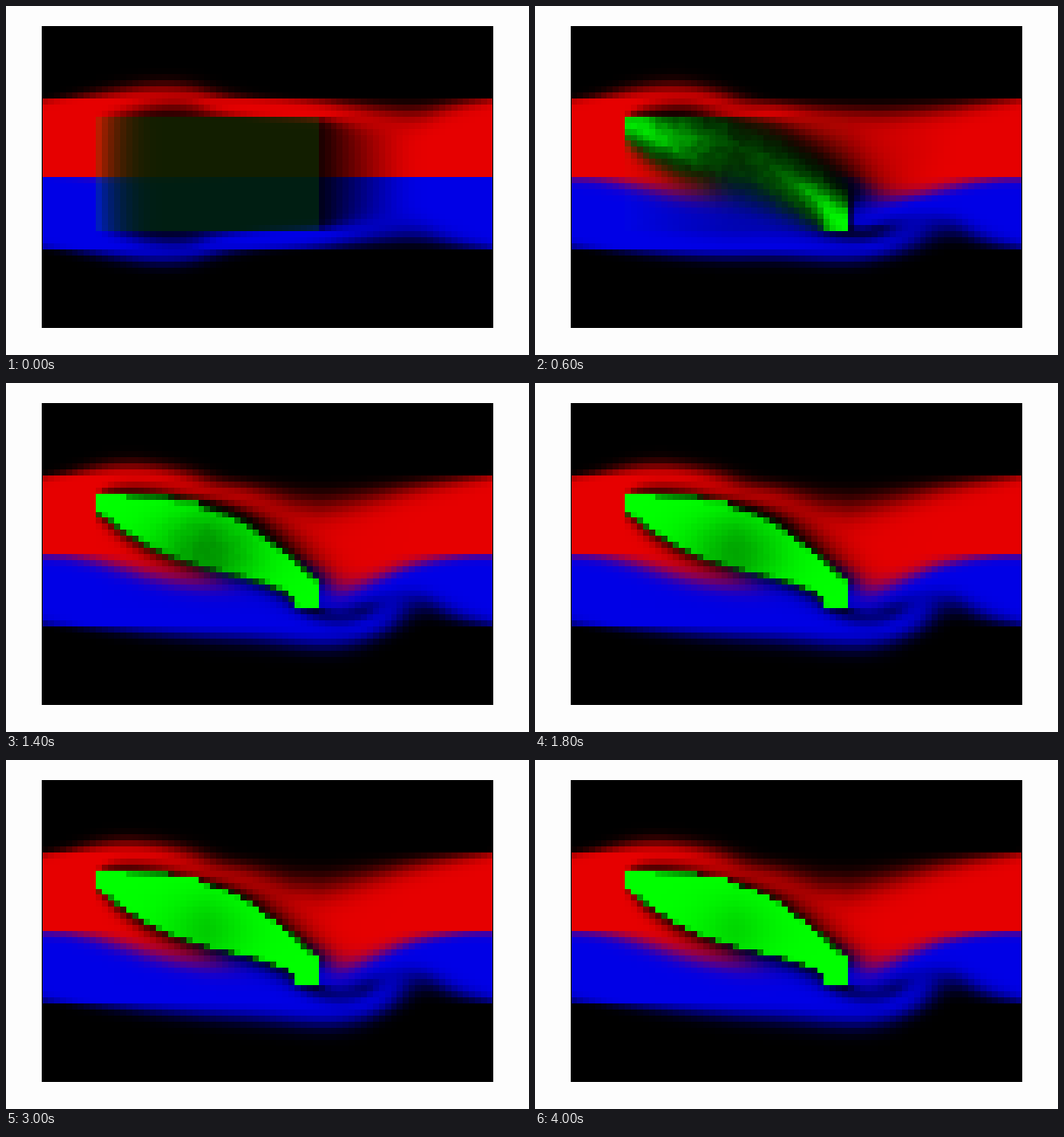
Recreate the animation shown at these times as an HTML page with a canvas. Size 600 by 400 pixels, loop 4.2 s.

```html
<!DOCTYPE html>
<html lang="en">
<head>
<meta charset="utf-8">
<title>Wing in a smoke tunnel</title>
<style>
  html, body { margin: 0; width: 100%; height: 100%; overflow: hidden; background: #fdfdfd; }
  canvas { display: block; }
</style>
</head>
<body>
<canvas id="stage" width="600" height="400"></canvas>
<script>
const COLS = 75, ROWS = 50, N = COLS * ROWS;
const STEP = 200, FRAMES = 21;
const FLOW_STEPS = 20, RELAX = 50;
const BOX = { x: 41, y: 23, w: 518, h: 346 };
const AREA = { left: 9, right: 46, top: 15, bottom: 34 };
const CELL = BOX.w / COLS;

// Wing outline in stage pixels
const UPPER = [[103, 121], [128, 124], [140, 130.5], [186, 130.5], [193, 133.5], [217, 134], [224, 140],
  [255, 150], [276, 161], [297, 177], [317, 191], [331, 203], [345, 218], [358, 228]];
const LOWER = [[103, 147], [117, 154], [131, 168], [165, 189], [193, 203], [235, 216],
  [262, 222], [297, 230], [324, 240], [338, 262], [358, 275]];

// Step of the optimisation, then solidity of core, rise to the tips, outside, edge width
const CORE = [[0, -1], [1, -.95], [2, -.85], [3, -.75], [5, -.1], [7, .15], [11, .45], [15, .7], [20, .85]];
const TIPS = [[0, 0], [1, .6], [2, 1.3], [3, 1.9], [5, 2.1], [7, 2.4], [11, 2.8], [20, 3.2]];
const OUTSIDE = [[0, -1], [1, -1.4], [3, -2.2], [5, -3], [7, -3.3], [11, -3.6], [20, -4]];
const EDGE = [[0, 4], [3, 4], [5, 2], [7, 1.1], [11, .7], [20, .5]];
const GRAIN = [[0, 0], [3, .1], [7, .04], [11, 0]];

const clamp = (v, lo, hi) => Math.max(lo, Math.min(hi, v));
const field = value => new Float64Array(N).fill(value);

function curve(points, x) {
  if (x <= points[0][0]) return points[0][1];
  for (let i = 1; i < points.length; i++) {
    const [x0, y0] = points[i - 1], [x1, y1] = points[i];
    if (x <= x1) return y0 + (y1 - y0) * (x - x0) / (x1 - x0);
  }
  return points[points.length - 1][1];
}

function grain(i) {
  const s = Math.sin(i * 12.9898) * 43758.5453;
  return (s - Math.floor(s)) * 2 - 1;
}

// Neighbours wrap around both axes
const L = new Int32Array(N), R = new Int32Array(N), U = new Int32Array(N), D = new Int32Array(N);
for (let i = 0; i < N; i++) {
  const c = i % COLS, r = (i - c) / COLS;
  L[i] = r * COLS + (c + COLS - 1) % COLS;
  R[i] = r * COLS + (c + 1) % COLS;
  U[i] = (r + ROWS - 1) % ROWS * COLS + c;
  D[i] = (r + 1) % ROWS * COLS + c;
}

function solidity(step) {
  const core = curve(CORE, step), tips = curve(TIPS, step), outside = curve(OUTSIDE, step);
  const edge = curve(EDGE, step), rough = curve(GRAIN, step);
  const solid = field(0);
  for (let r = AREA.top; r < AREA.bottom; r++) {
    for (let c = AREA.left; c < AREA.right; c++) {
      const i = r * COLS + c;
      const x = BOX.x + (c + .5) * CELL, y = BOX.y + (r + .5) * BOX.h / ROWS;
      const depth = Math.min(y - curve(UPPER, x), curve(LOWER, x) - y) / CELL;
      const inside = clamp(.6 + .5 * depth / edge, 0, 1);
      const along = Math.abs(x - 230) / 127, across = (y - 195) / 45;
      const tip = Math.min(1.3, along ** 1.6 + .25 * across * across);
      const level = outside + (core + tips * tip - outside) * inside + rough * grain(i);
      solid[i] = .5 * (Math.tanh(level) + 1);
    }
  }
  return solid;
}

function advect(f, vx, vy) {
  const out = field(0);
  for (let i = 0; i < N; i++) {
    const c = i % COLS, r = (i - c) / COLS;
    const x = c - vx[i], y = r - vy[i];
    const x0 = Math.floor(x), y0 = Math.floor(y), fx = x - x0, fy = y - y0;
    const col = ((x0 % COLS) + COLS) % COLS, row = ((y0 % ROWS) + ROWS) % ROWS;
    const a = row * COLS + col, b = D[a];
    out[i] = (1 - fy) * ((1 - fx) * f[a] + fx * f[R[a]]) + fy * ((1 - fx) * f[b] + fx * f[R[b]]);
  }
  return out;
}

// Smoke after a short run of an incompressible flow around the solid cells
function simulate(solid) {
  const open = solid.map(s => 1 - s);
  const weight = open.map((_, i) => 1 / (open[L[i]] + open[R[i]] + open[U[i]] + open[D[i]] + .001));

  const occlude = f => f.map((v, i) => v * open[i]);

  function fill(f, out) {
    for (let i = 0; i < N; i++) {
      const s = solid[i];
      if (s === 0) { out[i] = f[i]; continue; }
      const l = L[i], r = R[i], u = U[i], d = D[i];
      const near = f[l] * open[l] + f[r] * open[r] + f[u] * open[u] + f[d] * open[d];
      out[i] = f[i] * open[i] + s * near * weight[i];
    }
  }

  function project(vx, vy) {
    const raw = field(0), div = field(0), p = field(0);
    for (let i = 0; i < N; i++) raw[i] = -.5 * (vx[R[i]] - vx[L[i]] + vy[D[i]] - vy[U[i]]);
    fill(raw, div);
    for (let k = 0; k < RELAX; k++) {
      for (let i = 0; i < N; i++) raw[i] = (div[i] + p[L[i]] + p[R[i]] + p[U[i]] + p[D[i]]) / 4;
      fill(raw, p);
    }
    return [
      occlude(vx.map((v, i) => v - .5 * (p[R[i]] - p[L[i]]))),
      occlude(vy.map((v, i) => v - .5 * (p[D[i]] - p[U[i]])))
    ];
  }

  let red = field(0), blue = field(0);
  red.fill(1, 12 * COLS, 25 * COLS);
  blue.fill(1, 25 * COLS, 37 * COLS);
  let [vx, vy] = project(field(1), field(0));
  for (let t = 0; t < FLOW_STEPS; t++) {
    [vx, vy] = project(advect(vx, vx, vy), advect(vy, vx, vy));
    red = occlude(advect(red, vx, vy));
    blue = occlude(advect(blue, vx, vy));
  }
  return { red, blue };
}

const ctx = document.getElementById('stage').getContext('2d');
const images = [];

function imageAt(step) {
  if (images[step]) return images[step];
  const solid = solidity(step), { red, blue } = simulate(solid);
  const canvas = document.createElement('canvas');
  canvas.width = COLS;
  canvas.height = ROWS;
  const c = canvas.getContext('2d'), pixels = c.createImageData(COLS, ROWS);
  for (let i = 0; i < N; i++) {
    pixels.data.set([red[i] * 230, solid[i] * 255, blue[i] * 230, 255], i * 4);
  }
  c.putImageData(pixels, 0, 0);
  return images[step] = canvas;
}

function draw(time) {
  const step = Math.floor(time / STEP) % FRAMES;
  ctx.fillStyle = '#fdfdfd';
  ctx.fillRect(0, 0, 600, 400);
  ctx.imageSmoothingEnabled = false;
  ctx.drawImage(imageAt(step), BOX.x, BOX.y, BOX.w, BOX.h);
  ctx.strokeStyle = '#000';
  ctx.lineWidth = 1;
  ctx.strokeRect(BOX.x + .5, BOX.y + .5, BOX.w - 1, BOX.h - 1);
}

const start = performance.now();
function tick() {
  draw(performance.now() - start);
  requestAnimationFrame(tick);
}
tick();
</script>
</body>
</html>
```
